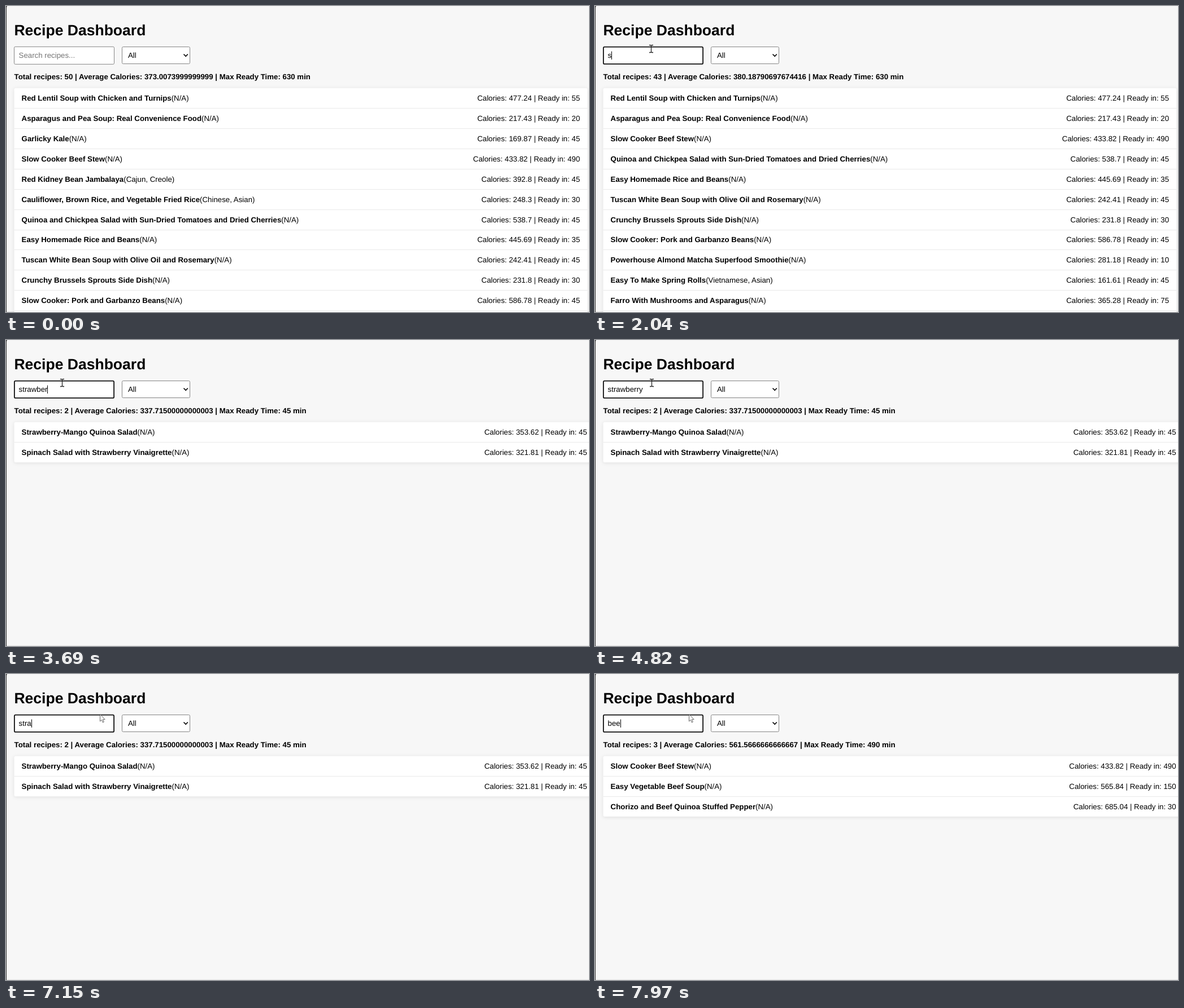
Animation, 1032 px wide and 543 px high, one loop 8000 ms. Source, as an HTML page:

```html
<!DOCTYPE html>
<html lang="en">
<head>
<meta charset="utf-8">
<title>Recipe Dashboard</title>
<style>
  html, body { margin: 0; width: 100%; height: 100%; overflow: hidden; background: #f7f7f7; }
  svg { display: block; font: 13.27px "Liberation Sans", Arial, sans-serif; text-rendering: geometricPrecision; }
  text { white-space: pre; }
  .bold { font-weight: bold; }
  .card { fill: #fff; filter: drop-shadow(0 1.6px 3.4px rgba(0, 0, 0, .1)); }
  .field { fill: #fff; stroke: #858585; }
  .focused { stroke: #101010; stroke-width: 1.8; }
</style>
</head>
<body>
<svg width="1032" height="543" viewBox="0 0 1032 543">
  <rect width="1032" height="543" fill="#f7f7f7"/>
  <path d="M0 542.5H1032" stroke="#e4e4e4"/>
  <path d="M0 0H2Q1 1 1 4V543H0Z" fill="#333"/>
  <text class="bold" x="14.4" y="52" font-size="26.54">Recipe Dashboard</text>
  <rect id="box" class="field"/>
  <text id="query" x="22.6" y="92"></text>
  <path id="caret" stroke="#000"/>
  <rect class="field" x="205.5" y="72.5" width="120" height="30" rx="2"/>
  <text x="216" y="92">All</text>
  <path d="M314.5 85.5L318.2 89.2L321.9 85.5" fill="none" stroke="#111" stroke-width="1.7"/>
  <text id="stats" class="bold" x="14.6" y="130"></text>
  <g id="list"></g>
  <g id="pointer">
    <path id="arrow" d="M.5 .5V13L3.4 10.4L5.3 15L7.3 14.1L5.4 9.7H9.2Z" fill="#fff" stroke="#555" stroke-width=".9"/>
    <path id="beam" d="M-3 -6.5H-1Q.5 -6.5 .5 -5V5Q.5 6.5 -1 6.5H-3M4 -6.5H2Q.5 -6.5 .5 -5M.5 5Q.5 6.5 2 6.5H4" fill="none" stroke="#222" stroke-width="1.3"/>
  </g>
</svg>
<script>
const LOOP = 8000, FOCUS = 1370, ROW = 35.92;
const $ = id => document.getElementById(id);

// name | cuisine | calories | minutes
const recipes = `Red Lentil Soup with Chicken and Turnips|N/A|477.24|55
Asparagus and Pea Soup: Real Convenience Food|N/A|217.43|20
Garlicky Kale|N/A|169.87|45
Slow Cooker Beef Stew|N/A|433.82|490
Red Kidney Bean Jambalaya|Cajun, Creole|392.8|45
Cauliflower, Brown Rice, and Vegetable Fried Rice|Chinese, Asian|248.3|30
Quinoa and Chickpea Salad with Sun-Dried Tomatoes and Dried Cherries|N/A|538.7|45
Easy Homemade Rice and Beans|N/A|445.69|35
Tuscan White Bean Soup with Olive Oil and Rosemary|N/A|242.41|45
Crunchy Brussels Sprouts Side Dish|N/A|231.8|30
Slow Cooker: Pork and Garbanzo Beans|N/A|586.78|45
Powerhouse Almond Matcha Superfood Smoothie|N/A|281.18|10
Broccolini Quinoa Pilaf|N/A|462.83|30
Easy To Make Spring Rolls|Vietnamese, Asian|161.61|45
Farro With Mushrooms and Asparagus|N/A|365.28|75
Cannellini Bean and Asparagus Salad with Mushrooms|N/A|482.31|45
Moroccan Chickpea and Lentil Stew|N/A|370.94|55
Easy Vegetable Beef Soup|N/A|565.84|150
Strawberry-Mango Quinoa Salad|N/A|353.62|45
Berry Banana Breakfast Smoothie|N/A|457.24|5
Spinach Salad with Strawberry Vinaigrette|N/A|321.81|45
Chorizo and Beef Quinoa Stuffed Pepper|N/A|685.04|30`.split("\n").map(line => {
  const [name, cuisine, calories, minutes] = line.split("|");
  return { name, cuisine, calories: +calories, minutes: +minutes };
});

// Totals that include recipes further down the page.
const pageTotals = { "": [50, "373.0073999999999", 630], s: [43, "380.18790697674416", 630] };

const edits = [[0, ""], [2040, "s"], [2230, "st"], [2360, "str"], [2630, "stra"], [2830, "straw"],
  [3290, "strawb"], [3420, "strawbe"], [3690, "strawber"], [3820, "strawberr"], [3950, "strawberry"],
  [6290, "strawberr"], [6950, "strawber"], [7020, "strawb"], [7100, "stra"], [7170, "st"], [7240, ""],
  [7770, "b"], [7830, "be"], [7970, "bee"]];

const caretOff = [[0, FOCUS], [1900, 2040], [4490, 5020], [5560, 6090], [6550, 7090], [7640, 7770]];

// time, x, y
const path = [[590, 960, 530], [790, 118, 137], [985, 118, 137], [1200, 101, 64], [1370, 99, 76],
  [4815, 99, 76], [4820, 100, 76], [5400, 160, 73], [5560, 165, 71], [5630, 166, 71], [LOOP, 166, 71]];

function pointerAt(t) {
  const i = path.findIndex(p => p[0] > t);
  const [t0, x0, y0] = path[i - 1], [t1, x1, y1] = path[i];
  const tick = t0 + Math.floor((t - t0 + 1) / 67) * 67;
  const k = Math.min(1, (tick - t0) / (t1 - t0));
  return [x0 + (x1 - x0) * k, y0 + (y1 - y0) * k].map(Math.round);
}

function showRecipes(query) {
  const found = recipes.filter(r => r.name.toLowerCase().includes(query));
  const [count, average, longest] = pageTotals[query] || [
    found.length,
    found.reduce((sum, r) => sum + r.calories, 0) / found.length,
    Math.max(...found.map(r => r.minutes))];
  $("stats").textContent =
    `Total recipes: ${count} | Average Calories: ${average} | Max Ready Time: ${longest} min`;

  // A long list brings a page scrollbar, which narrows the card.
  const right = found.length > 10 ? 1029.3 : 1041.8;
  const rows = found.slice(0, 12).map((r, i) => {
    const y = Math.round(168 + ROW * i), line = Math.round(181 + ROW * i) + .5;
    const divider = i < found.length - 1 ? `<path d="M14.5 ${line}H${right}" stroke="#e9e9e9"/>` : "";
    return `${divider}<text x="27.6" y="${y}"><tspan class="bold">${r.name}</tspan>(${r.cuisine})</text>
      <text x="${right - 13.2}" y="${y}" text-anchor="end">Calories: ${r.calories} | Ready in: ${r.minutes}</text>`;
  });
  $("list").innerHTML = `<rect class="card" x="14.5" y="145.7" width="${right - 14.5}"
    height="${ROW * found.length - .4}" rx="3"/>` + rows.join("");
}

function setBox(focused) {
  const inset = focused ? .9 : .5;
  const shape = { x: 14 + inset, y: 71.8 + inset, width: 178 - 2 * inset, height: 32 - 2 * inset, rx: 2 };
  for (const key in shape) $("box").setAttribute(key, shape[key]);
  $("box").setAttribute("class", focused ? "field focused" : "field");
}

let shownQuery, start;

function draw(now) {
  start ??= now;
  const t = (now - start) % LOOP;
  const query = edits.findLast(e => e[0] <= t)[1];
  if (query !== shownQuery) {
    shownQuery = query;
    $("query").textContent = query || "Search recipes...";
    $("query").setAttribute("fill", query ? "#000" : "#757575");
    const width = query ? $("query").getComputedTextLength() : 0;
    $("caret").setAttribute("d", `M${Math.round(22.6 + width) + .5} 80.5V95`);
    showRecipes(query);
  }
  setBox(t >= FOCUS);
  const hidden = caretOff.some(([from, to]) => t >= from && t < to);
  $("caret").setAttribute("visibility", hidden ? "hidden" : "visible");

  const visible = t >= path[0][0];
  $("pointer").setAttribute("display", visible ? "inline" : "none");
  if (visible) {
    const [x, y] = pointerAt(t);
    const overInput = y >= 72 && y < 104;
    $("pointer").setAttribute("transform", `translate(${x} ${y})`);
    $("arrow").setAttribute("display", overInput ? "none" : "inline");
    $("beam").setAttribute("display", overInput ? "inline" : "none");
  }
  requestAnimationFrame(draw);
}
requestAnimationFrame(draw);
</script>
</body>
</html>
```
